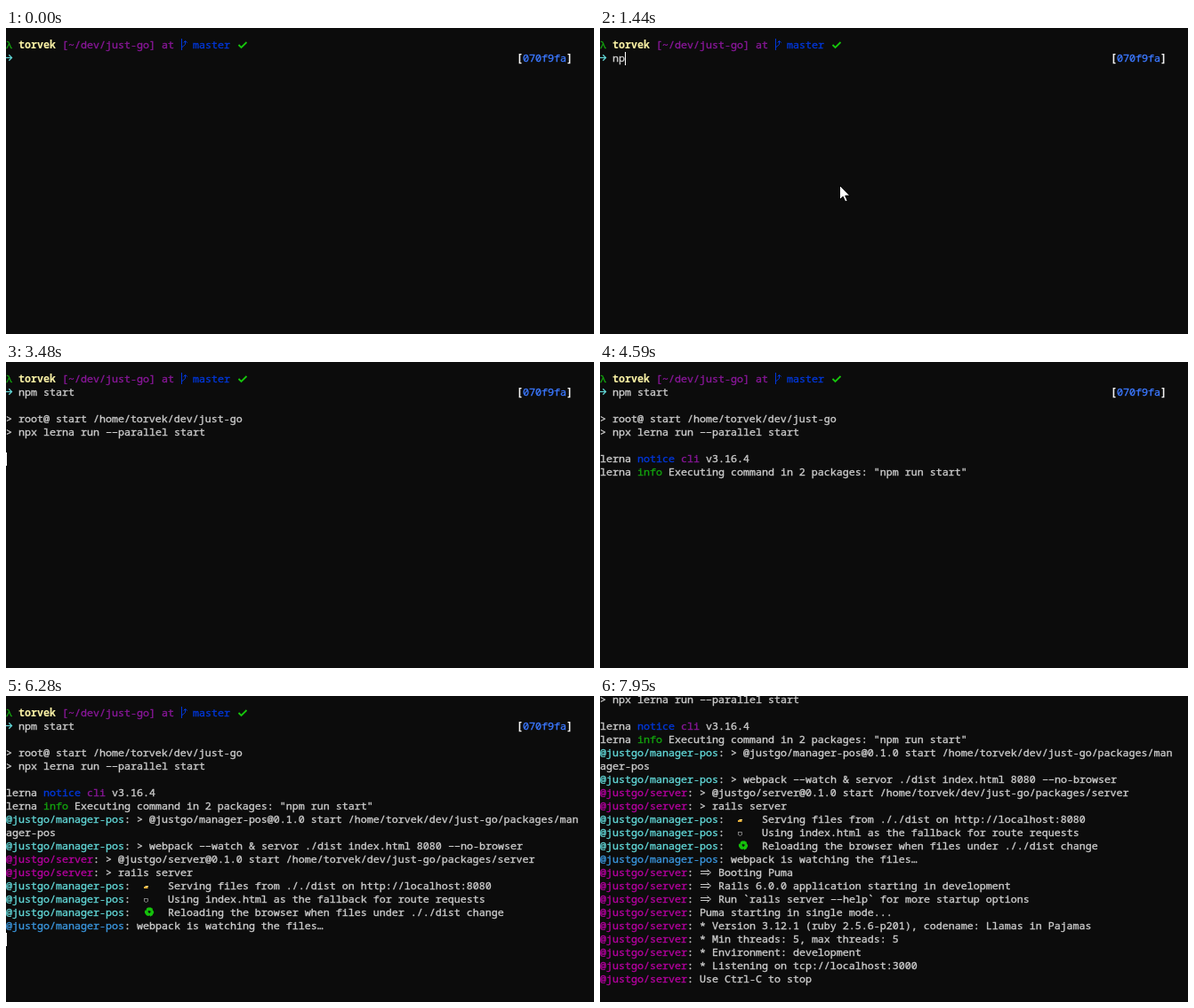
An HTML page with a canvas that plays this animation: 661 px wide and 345 px high, repeating every 8000 ms.

```html
<!DOCTYPE html>
<html lang="en">
<head>
<meta charset="utf-8">
<title>Terminal session</title>
<style>
  html, body { margin: 0; width: 100%; height: 100%; overflow: hidden; background: #0c0c0c; }
  canvas { display: block; width: 661px; height: 345px; }
</style>
</head>
<body>
<canvas id="stage" width="661" height="345"></canvas>
<script>
const ctx = document.getElementById('stage').getContext('2d');
const LOOP = 8000, CELL = 7, LINE = 15, TOP = 12, BASE = 11, LAST_ROW = 21;
const FONT = '11.667px "Noto Sans Mono", monospace';

const color = {
  text: '#cccccc', white: '#f2f2f2', yellow: '#f9f1a5', green: '#13a10e',
  lime: '#16c60c', purple: '#881798', magenta: '#b4009e', blue: '#0037da',
  sky: '#3b78ff', cyan: '#61d6d6', teal: '#3a96dd'
};

const plain = text => [['text', text]];
const manager = (text, tone = 'cyan') => [[tone, '@justgo/manager-pos'], ['text', ': ' + text]];
const server = text => [['magenta', '@justgo/server'], ['text', ': ' + text]];

// Lines appended at each time; a line is a list of [colour, text, bold]
const output = [
  { at: 0, lines: [
    [['green', 'λ '], ['yellow', 'torvek ', true], ['purple', '[~/dev/just-go] at   '], ['blue', 'master']],
    plain('')
  ] },
  { at: 3480, lines: [
    plain(''),
    plain('> root@ start /home/torvek/dev/just-go'),
    plain('> npx lerna run --parallel start'),
    plain('')
  ] },
  { at: 4310, lines: [[['text', 'lerna '], ['blue', 'notice '], ['purple', 'cli '], ['text', 'v3.16.4']]] },
  { at: 4410, lines: [
    [['text', 'lerna '], ['green', 'info '], ['text', 'Executing command in 2 packages: "npm run start"']]
  ] },
  { at: 4970, lines: [
    manager('> @justgo/manager-pos@0.1.0 start /home/torvek/dev/just-go/packages/man'),
    plain('ager-pos'),
    manager('> webpack --watch & servor ./dist index.html 8080 --no-browser'),
    server('> @justgo/server@0.1.0 start /home/torvek/dev/just-go/packages/server'),
    server('> rails server')
  ] },
  { at: 5150, lines: [
    manager('     Serving files from ././dist on http://localhost:8080'),
    manager('     Using index.html as the fallback for route requests'),
    manager('     Reloading the browser when files under ././dist change')
  ] },
  { at: 6180, lines: [manager('webpack is watching the files…', 'teal')] },
  { at: 7390, lines: [
    server('=> Booting Puma'),
    server('=> Rails 6.0.0 application starting in development'),
    server('=> Run `rails server --help` for more startup options')
  ] },
  { at: 7950, lines: [
    server('Puma starting in single mode...'),
    server('* Version 3.12.1 (ruby 2.5.6-p201), codename: Llamas in Pajamas'),
    server('* Min threads: 5, max threads: 5'),
    server('* Environment: development'),
    server('* Listening on tcp://localhost:3000'),
    server('Use Ctrl-C to stop')
  ] }
];

// Typing: the window gets focus, keys follow in an even rhythm, then Enter
const command = 'npm start';
const FOCUS = 980, ENTER = 3020, HOLD = 480, BLINK = 560, BLINK_START = 3470;
const keyTimes = [...command].map((_, i) => 1260 + 138 * i + 80 * Math.sin(Math.PI * i / 8));
const typedCount = t => keyTimes.filter(k => k <= t).length;

const baseline = row => TOP + row * LINE + BASE;

function stroke(points, tone, width = 1) {
  ctx.beginPath();
  points.forEach(([x, y]) => ctx.lineTo(x, y));
  ctx.strokeStyle = tone;
  ctx.lineWidth = width;
  ctx.stroke();
}

// Text with a hairline outline, for a medium weight
function glyphs(text, x, y, tone, outline = 0.35) {
  ctx.fillStyle = ctx.strokeStyle = tone;
  ctx.lineWidth = outline;
  ctx.fillText(text, x, y);
  ctx.strokeText(text, x, y);
}

function drawDashes(x, y, tone) {
  for (const dx of [0.8, 7.6]) stroke([[x + dx, y - 3.5], [x + dx + 5.6, y - 3.5]], tone);
}

function drawFatArrow(x, y, tone) {
  for (const dy of [5.5, 2.5]) stroke([[x + 1, y - dy], [x + 10.5, y - dy]], tone);
  stroke([[x + 8.5, y - 7.5], [x + 12.5, y - 4], [x + 8.5, y - 0.5]], tone);
}

function drawText(text, col, row, name = 'text', bold = false) {
  const y = baseline(row), tone = color[name];
  for (const part of text.split(/(--|=>)/)) {
    const x = col * CELL;
    ctx.font = (bold ? 'bold ' : '') + FONT;
    if (part === '--') drawDashes(x, y, tone);
    else if (part === '=>') drawFatArrow(x, y, tone);
    else glyphs(part, x, y, tone, bold ? 0.1 : 0.35);
    col += part.length;
  }
  return col;
}

function drawPrompt(t) {
  // branch sign
  stroke([[197.5, 12], [197.5, 25]], color.blue);
  stroke([[197.5, 22], [201.5, 18.5], [201.5, 15]], color.blue);
  stroke([[199.5, 16.5], [201.5, 14.5], [203.8, 16.5]], color.blue);
  // tick
  stroke([[261.5, 19], [264.5, 22], [270.5, 16]], color.lime, 1.8);
  // prompt arrow
  stroke([[0, 33.5], [6.3, 33.5]], color.cyan, 1.2);
  stroke([[3.3, 30.3], [6.5, 33.5], [3.3, 36.7]], color.cyan, 1.3);

  drawText('[', 82, 1, 'white', true);
  drawText('070f9fa', 83, 1, 'sky');
  drawText(']', 90, 1, 'white', true);
  drawText(command.slice(0, typedCount(t)), 2, 1);
}

function drawIcons() {
  // folder
  stroke([[155, 216], [159.5, 216]], '#e8b03a', 2);
  stroke([[156.5, 214.5], [160, 214.5]], '#ffe08a');
  // page
  stroke([[155.5, 228.5], [159.5, 228.5], [159.5, 231.5], [157.5, 232.5],
    [155.5, 231.5], [155.5, 228]], '#9a9a9a', 0.8);
  ctx.font = '13px "DejaVu Sans", sans-serif';
  glyphs('\u267B', 155, baseline(15), color.lime, 0.9);
}

function drawCursor(t, nextRow) {
  const lastKey = t >= ENTER ? ENTER : keyTimes[typedCount(t) - 1] ?? FOCUS;
  const held = t >= FOCUS && t - lastKey < HOLD;
  const blinkOn = t > BLINK_START && (t - BLINK_START) % (2 * BLINK) >= BLINK;
  if (!held && !blinkOn) return;
  const [row, col] = t < ENTER ? [1, 2 + typedCount(t)] : [nextRow, 0];
  ctx.fillStyle = '#ffffff';
  ctx.fillRect(col * CELL, TOP + row * LINE, 1, LINE);
}

const backOut = (p, s = 1.3) => 1 + (s + 1) * (p - 1) ** 3 + s * (p - 1) ** 2;

// Glides in past its resting place, rests, then leaves on the right
function drawPointer(t) {
  if (t < 80 || t >= 2460) return;
  const p = backOut(Math.min(Math.floor((t - 80) / 88) / 5, 1));
  const [x, y] = t < 2360 ? [473 - 203 * p, 334 - 156 * p] : [650, 262];
  const outline = [[0, 0], [0, 16], [3.7, 12.6], [6.2, 18.3], [8.7, 17.2], [6.2, 11.6], [11.3, 11.6]];
  ctx.beginPath();
  outline.forEach(([dx, dy]) => ctx.lineTo(x - 0.5 + dx, y - 0.5 + dy));
  ctx.closePath();
  ctx.fillStyle = '#ffffff';
  ctx.fill();
  ctx.strokeStyle = '#000000';
  ctx.lineWidth = 1;
  ctx.stroke();
}

function draw(t) {
  ctx.fillStyle = '#0c0c0c';
  ctx.fillRect(0, 0, 661, 345);

  const lines = output.filter(step => step.at <= t).flatMap(step => step.lines);
  const scroll = Math.max(0, lines.length - LAST_ROW);

  ctx.save();
  ctx.translate(0, -scroll * LINE);
  lines.forEach((line, row) => {
    let col = 0;
    for (const [name, text, bold] of line) col = drawText(text, col, row, name, bold);
  });
  drawPrompt(t);
  if (t >= 5150) drawIcons();
  drawCursor(t, lines.length);
  ctx.restore();

  drawPointer(t);
}

const start = performance.now();
function tick() {
  draw((performance.now() - start) % LOOP);
  requestAnimationFrame(tick);
}
tick();
</script>
</body>
</html>
```
